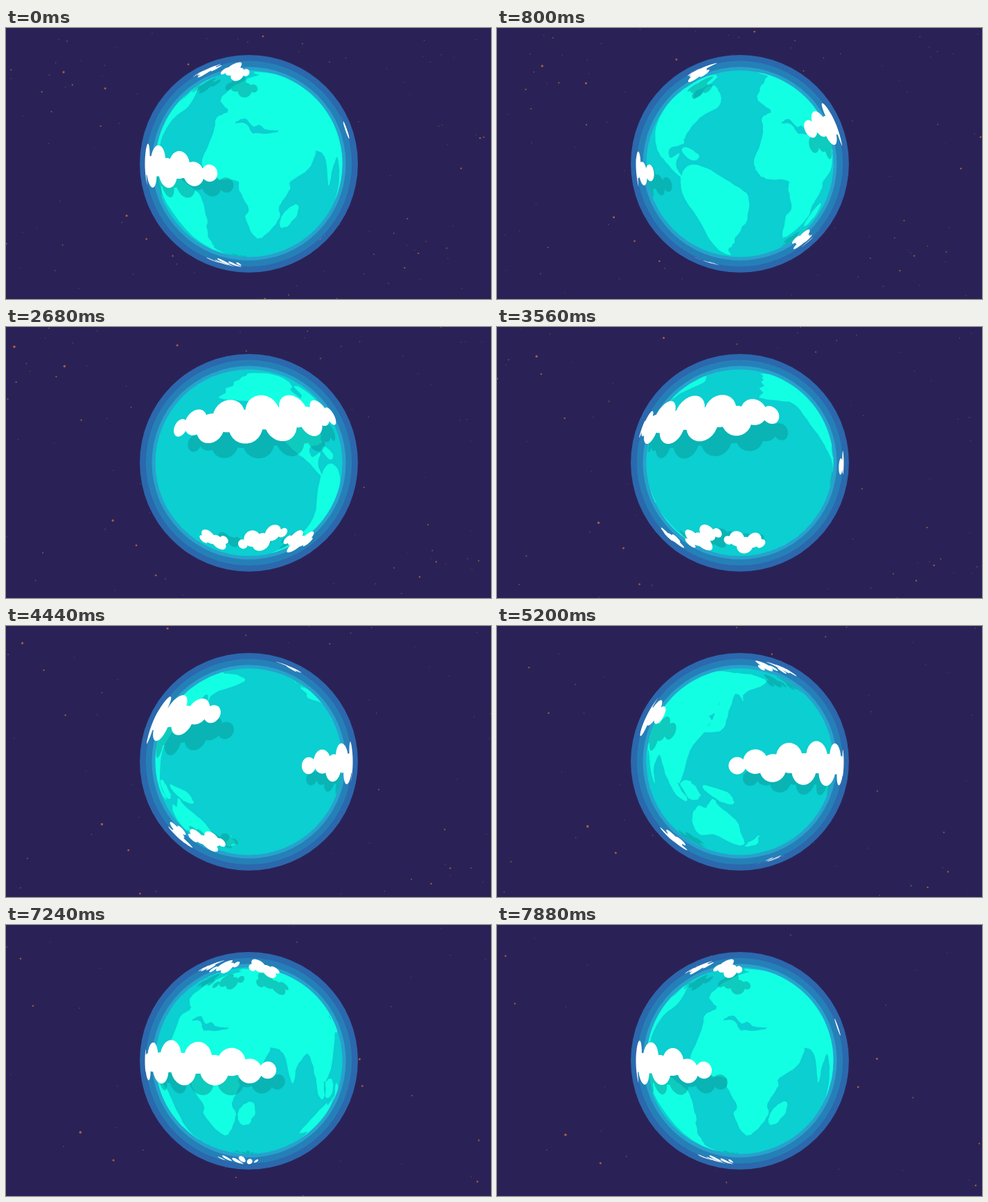
An HTML page that plays this animation: 700 px wide and 392 px high, repeating every 7920 ms.

```html
<!DOCTYPE html>
<html lang="en">
<head>
<meta charset="utf-8">
<title>Turning globe</title>
<style>
html, body { margin: 0; width: 100%; height: 100%; overflow: hidden; background: #2a2256; }
svg { display: block; width: 100vw; height: 100vh; }
</style>
</head>
<body>
<svg viewBox="0 0 700 392">
  <rect width="700" height="392" fill="#2a2256"/>
  <g id="stars" fill="#a8603f"></g>
  <g transform="translate(350.5 196.3)">
    <circle r="157.4" fill="#2b68ad"/>
    <circle r="148.7" fill="#2580b8"/>
    <circle r="140" fill="#27a2cd"/>
    <circle r="135" fill="#0bcfd0"/>
  </g>
  <path id="land" fill="#12ffe3"/>
  <path id="seas" fill="#0bcfd0"/>
  <path id="shadow" fill="#0a9c9c" fill-opacity=".52"/>
  <path id="clouds" fill="#fff"/>
</svg>
<script>
const LOOP = 7920, STEP = 40, CX = 350.5, CY = 196.3, GLOBE = 135, SKY = 150;
const EYE = 15, LENS = Math.sqrt(EYE * EYE - 1); // viewing distance in sphere radii
const TAU = Math.PI * 2, DEG = TAU / 360;
const SHADE = 7.5 * DEG;
const turn = ms => TAU * ms / LOOP;
const clamp = (v, lim) => Math.max(-lim, Math.min(lim, v));
const el = id => document.getElementById(id);

let seed = 11;
const rnd = () => (seed = seed * 16807 % 2147483647) / 2147483647;

// Screen point on a sphere of radius R -> [longitude, latitude]
function unproject(x, y, R) {
  const u = (x - CX) / R, v = (CY - y) / R;
  const k = (u * u + v * v) / (LENS * LENS);
  const z = (k * EYE + Math.sqrt(Math.max(0, 1 + k - k * EYE * EYE))) / (1 + k);
  const s = (EYE - z) / LENS;
  return [Math.atan2(u * s, z), Math.asin(clamp(v * s, 1))];
}

// Points behind the horizon slide along it, so hidden parts have no area
function project(lon, lat, R) {
  const b = clamp(lat, Math.acos(1 / EYE));
  const a = clamp(lon, Math.acos(Math.min(1, 1 / (EYE * Math.cos(b)))));
  const s = R * LENS / (EYE - Math.cos(a) * Math.cos(b));
  return (CX + s * Math.cos(b) * Math.sin(a)).toFixed(2) + ' ' + (CY - s * Math.sin(b)).toFixed(2);
}

// Ragged closed Catmull-Rom curve
function smooth(pts, n = 5) {
  const len = pts.length, rough = () => (rnd() - 0.5) * 1.6;
  return pts.flatMap((_, i) => {
    const [a, b, c, d] = [-1, 0, 1, 2].map(k => pts[(i + k + len) % len]);
    return Array.from({ length: n }, (_, s) => {
      const u = s / n;
      return [0, 1].map(k => rough() + b[k] + 0.5 * u * (c[k] - a[k] +
        u * (2 * a[k] - 5 * b[k] + 4 * c[k] - d[k] + u * (3 * (b[k] - c[k]) + d[k] - a[k]))));
    });
  });
}

const area = pts => pts.reduce((sum, [x, y], i) => {
  const [px, py] = pts.at(i - 1);
  return sum + px * y - x * py;
}, 0);

// Key points of an outline as it looks at time ms; always wound the same way
function coast(ms, text) {
  const pts = text.trim().split(/\s+/).map(p => p.split(',').map(Number));
  if (area(pts) < 0) pts.reverse();
  return smooth(pts).map(([x, y]) => {
    const [lon, lat] = unproject(x, y, GLOBE);
    return [lon - turn(ms), lat];
  });
}

const africaEurope = coast(0, `284,190 300,150 304,130 321,120 309,105 325,87 358,70 394,72
  440,150 447,177 436,204 411,222 409,236 394,258 395,274 376,298 360,303 346,275 350,262
  337,235 333,221 300,218 287,207`);
const madagascar = coast(0, '420,255 419,272 402,289 395,284 402,266');
const southAsia = coast(7240, `383,177 400,186 413,229 420,205 436,187 447,222 450,245 459,251
  459,212 473,180 470,140 425,85 380,69 335,72 325,120 345,165`);
const borneo = coast(7240, '462,227 471,224 470,243 462,250');
const eastAsia = coast(5960, `300,72 345,65 384,72 396,85 388,110 391,124 371,135 374,152
  366,168 339,228 318,190 285,130`);
const japan = coast(5960, '390,98 402,100 407,138 402,152 374,152 387,140');
const siberia = coast(4440, '262,112 285,85 318,69 345,79 300,98 291,111 290,99');
const newGuinea = coast(4440, '236,230 260,240 271,257 252,250');
const australia = coast(5960, `342,302 346,278 366,260 376,263 390,250 397,262 410,280 402,308
  388,316 368,302`);
const newZealand = coast(5960, '394,318 405,311 422,302 408,314');
const northAmerica = coast(1640, `254,106 284,82 322,67 354,70 354,83 341,90 347,101 356,97
  357,84 376,87 396,112 374,130 357,158 356,167 330,174 333,188 351,181 345,198 355,217
  322,193 299,176 276,140 275,111`);
const cuba = coast(1640, '354,177 365,173 385,185 374,192');
const southAmerica = coast(1640, `353,217 368,199 395,202 426,223 442,243 430,275 403,302
  384,315 358,327 367,285 352,240`);

const land = [africaEurope, madagascar, southAsia, borneo, eastAsia, japan, siberia, newGuinea,
  australia, newZealand, northAmerica, cuba, southAmerica];
const seas = [coast(0, '331,137 345,131 357,142 366,140 376,147 394,149 380,152 357,152 347,139')];

// A puff is a circle when it faces the viewer
const puff = (lon, y, r) => Array.from({ length: 26 }, (_, i) => {
  const a = TAU * i / 26;
  const [dLon, lat] = unproject(CX + r * Math.cos(a), y + r * Math.sin(a), SKY);
  return [lon + dLon, lat];
});

// A row of puffs, thick in the middle, bobbing up and down
function cloud({ from, to, y, size, count, tilt = 0, arch = 0 }) {
  return Array.from({ length: count }, (_, i) => {
    const u = i / (count - 1), mid = Math.sin(Math.PI * u) ** 0.6;
    const bob = mid * size * (i % 2 ? -0.38 : 0.38);
    const r = size * (0.52 + 0.48 * mid);
    return puff((from + (to - from) * u) * DEG, y + tilt * (u - 0.5) + arch * (2 * u - 1) ** 2 + bob, r);
  });
}

const clouds = [
  { from: 235, to: 339, y: 199, size: 24, count: 12, tilt: 8, arch: 7 },
  { from: 80, to: 180, y: 133, size: 25, count: 11, tilt: -18, arch: 3 },
  { from: 85, to: 103, y: 308, size: 11, count: 4 },
  { from: 117, to: 146, y: 306, size: 13, count: 5, tilt: -16 },
  { from: 153, to: 179, y: 311, size: 12, count: 5, tilt: 5 },
  { from: 285, to: 342, y: 340, size: 4.5, count: 6, tilt: 3 },
  { from: 333, to: 357, y: 63, size: 10, count: 4, tilt: 3 },
  { from: 288, to: 313, y: 60, size: 8, count: 4, tilt: -6 },
  { from: 262, to: 279, y: 60, size: 7.5, count: 3 }
].flatMap(cloud);

function outline(shapes, R, dLon, dLat = 0) {
  let d = '';
  for (const shape of shapes) {
    for (const wrap of [-2, -1, 0, 1, 2]) {
      const off = dLon + wrap * TAU;
      if (shape.every(p => p[0] + off > TAU / 4) || shape.every(p => p[0] + off < -TAU / 4)) continue;
      d += 'M' + shape.map(([lon, lat]) => project(lon + off, lat + dLat, R)).join('L') + 'Z';
    }
  }
  return d;
}

// Stars drift outwards as the viewer flies forward; depth is in seconds of flight
const stars = Array.from({ length: 120 }, () => {
  const node = document.createElementNS('http://www.w3.org/2000/svg', 'circle');
  el('stars').append(node);
  return { node, x: (rnd() - 0.5) * 700, y: (rnd() - 0.5) * 392, depth: 10 + rnd() * 22, bright: rnd() };
});

function drawStars(ms) {
  for (const { node, x, y, depth, bright } of stars) {
    const k = depth / (depth - ms / 1000);
    node.setAttribute('cx', CX + x * k);
    node.setAttribute('cy', CY + y * k);
    node.setAttribute('r', 0.6 + bright ** 3 * Math.min(1.3, k));
    node.setAttribute('opacity', 0.5 + 0.5 * bright);
  }
}

function draw(ms) {
  const spin = turn(ms);
  drawStars(ms);
  el('land').setAttribute('d', outline(land, GLOBE, spin));
  el('seas').setAttribute('d', outline(seas, GLOBE, spin));
  el('shadow').setAttribute('d', outline(clouds, GLOBE, SHADE - spin, -SHADE));
  el('clouds').setAttribute('d', outline(clouds, SKY, -spin));
}

const start = performance.now();
function frame() {
  const ms = (performance.now() - start) % LOOP;
  draw(Math.floor(ms / STEP) * STEP);
  requestAnimationFrame(frame);
}
frame();
</script>
</body>
</html>
```
